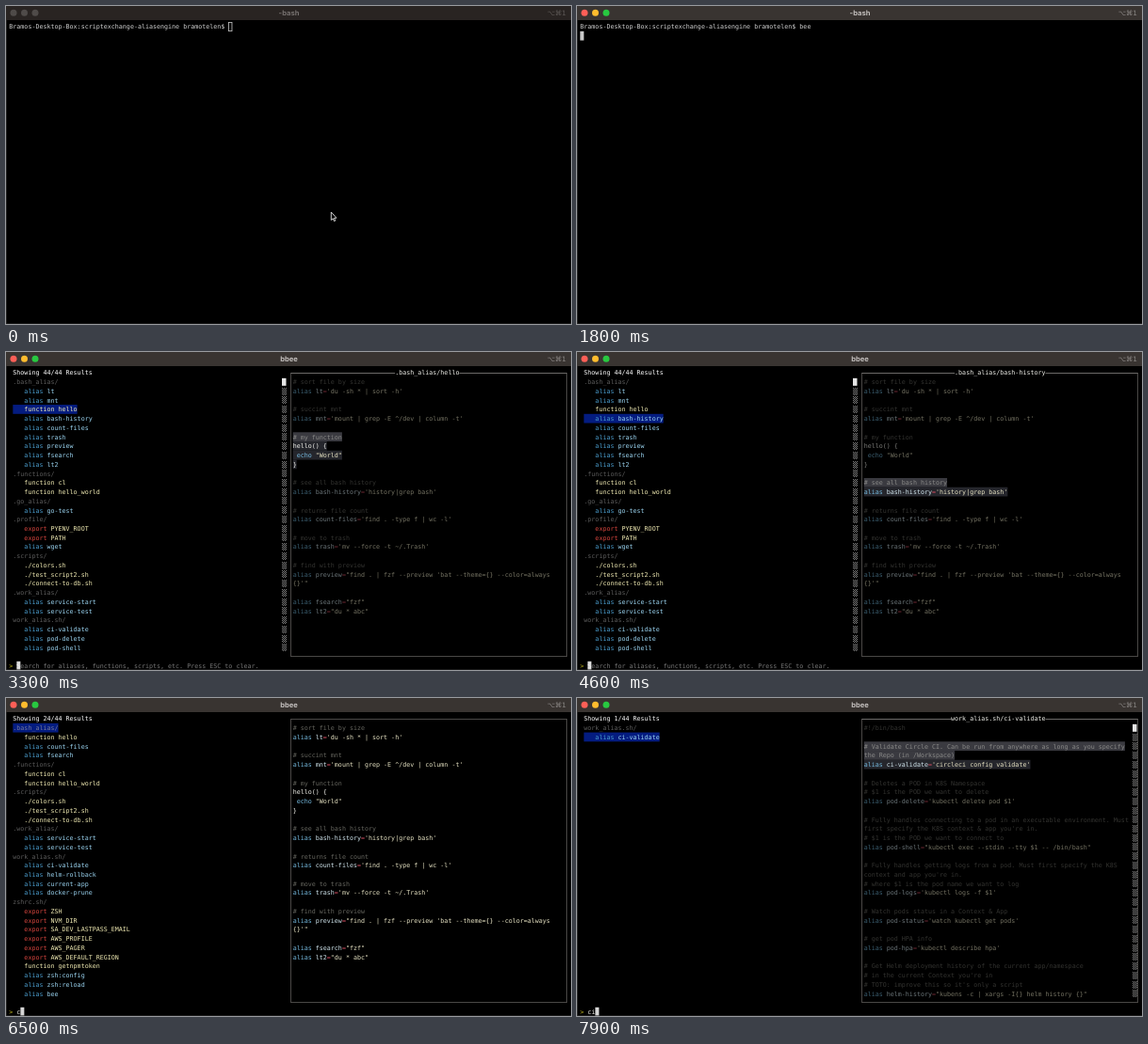
Write an HTML page with a canvas that moves like this. It is 600 px wide and 338 px high and loops after 8 s.

```html
<!DOCTYPE html>
<html lang="en">
<head>
<meta charset="utf-8">
<title>Alias browser in a terminal</title>
<style>
  html, body { margin: 0; width: 100%; height: 100%; overflow: hidden; background: #000; }
  canvas { display: block; width: 600px; height: 338px; }
</style>
</head>
<body>
<canvas id="stage"></canvas>
<script>
const LOOP = 8000, W = 600, H = 338;
const CELL_W = 4.018, CELL_H = 9.74, LEFT = 3.3, TOP = 17.1;
const PANEL_COL = 75, PANEL_COLS = 71, LAST_ROW = 32;
const MONO = '6.67px "DejaVu Sans Mono", monospace';
const C = {
  text: '#f0f0ea', grey: '#5c5c5c', cream: '#f2ecb4', blue: '#4a9ccc', sky: '#9bd5f2',
  red: '#d8463f', select: '#041c80', comment: '#66665f', keyword: '#76bbe0',
  name: '#d3e8f0', op: '#c84a5c', string: '#e8e4c4', markComment: '#3a3a40',
  markCode: '#25262c', border: '#4a4846', cursor: '#c9c9c9'
};

const PROMPT = 'Bramos-Desktop-Box:scriptexchange-aliasengine bramotelen$ ';
const HINT = 'Search for aliases, functions, scripts, etc. Press ESC to clear.';

const ALL = `.bash_alias/
 alias lt
 alias mnt
 function hello
 alias bash-history
 alias count-files
 alias trash
 alias preview
 alias fsearch
 alias lt2
.functions/
 function cl
 function hello_world
.go_alias/
 alias go-test
.profile/
 export PYENV_ROOT
 export PATH
 alias wget
.scripts/
 ./colors.sh
 ./test_script2.sh
 ./connect-to-db.sh
.work_alias/
 alias service-start
 alias service-test
work_alias.sh/
 alias ci-validate
 alias pod-delete
 alias pod-shell`.split('\n');

const WITH_C = `.bash_alias/
 function hello
 alias count-files
 alias fsearch
.functions/
 function cl
 function hello_world
.scripts/
 ./colors.sh
 ./test_script2.sh
 ./connect-to-db.sh
.work_alias/
 alias service-start
 alias service-test
work_alias.sh/
 alias ci-validate
 alias helm-rollback
 alias current-app
 alias docker-prune
zshrc.sh/
 export ZSH
 export NVM_DIR
 export SA_DEV_LASTPASS_EMAIL
 export AWS_PROFILE
 export AWS_PAGER
 export AWS_DEFAULT_REGION
 function getnpmtoken
 alias zsh:config
 alias zsh:reload
 alias bee`.split('\n');

const WITH_CI = ['work_alias.sh/', ' alias ci-validate'];

const BASH_FILE = `# sort file by size
alias lt='du -sh * | sort -h'

# succint mnt
alias mnt='mount | grep -E ^/dev | column -t'

# my function
hello() {
 echo "World"
}

# see all bash history
alias bash-history='history|grep bash'

# returns file count
alias count-files='find . -type f | wc -l'

# move to trash
alias trash='mv --force -t ~/.Trash'

# find with preview
alias preview="find . | fzf --preview 'bat --theme={} --color=always {}'"

alias fsearch="fzf"
alias lt2="du * abc"`;

const WORK_FILE = `#!/bin/bash

# Validate Circle CI. Can be run from anywhere as long as you specify the Repo (in /Workspace)
alias ci-validate='circleci config validate'

# Deletes a POD in K8S Namespace
# $1 is the POD we want to delete
alias pod-delete='kubectl delete pod $1'

# Fully handles connecting to a pod in an executable environment. Must first specify the K8S context & app you're in.
# $1 is the POD we want to connect to
alias pod-shell="kubectl exec --stdin --tty $1 -- /bin/bash"

# Fully handles getting logs from a pod. Must first specify the K8S context and app you're in.
# where $1 is the pod name we want to log
alias pod-logs='kubectl logs -f $1'

# Watch pods status in a Context & App
alias pod-status='watch kubectl get pods'

# get pod HPA info
alias pod-hpa='kubectl describe hpa'

# Get Helm deployment history of the current app/namespace
# in the current Context you're in
# TOTO: improve this so it's only a script
alias helm-history="kubens -c | xargs -I{} helm history {}"`;

// Each step overrides part of the state reached before it.
const STEPS = [
  [0, { active: false, title: '-bash', pointer: 'arrow', typed: '', app: false }],
  [100, { active: true, pointer: 'beam' }],
  [900, { typed: 'b', pointer: '' }],
  [1100, { typed: 'be' }],
  [1300, { typed: 'bee' }],
  [1700, { entered: true }],
  [2000, { app: true, list: ALL, found: 44, row: 0, file: BASH_FILE, block: -1, name: '', query: '' }],
  [2400, { row: 1, block: 0, name: '.bash_alias/lt' }],
  [2600, { title: 'bbee' }],
  [2800, { row: 2, block: 1, name: '.bash_alias/mnt' }],
  [3200, { row: 3, block: 2, name: '.bash_alias/hello' }],
  [3700, { row: 4, block: 3, name: '.bash_alias/bash-history' }],
  [6400, { list: WITH_C, found: 24, row: 0, block: -1, name: '', query: 'c' }],
  [6800, { list: WITH_CI, found: 1, file: WORK_FILE, query: 'ci' }],
  [7400, { row: 1, block: 1, name: 'work_alias.sh/ci-validate' }]
];

const canvas = document.getElementById('stage');
const g = canvas.getContext('2d');
const ratio = window.devicePixelRatio || 1;
canvas.width = W * ratio;
canvas.height = H * ratio;
g.scale(ratio, ratio);
g.textRendering = 'geometricPrecision';

const colX = col => LEFT + col * CELL_W;
const rowY = row => TOP + row * CELL_H;

function rect(x, y, w, h, color) {
  g.fillStyle = color;
  g.fillRect(x, y, w, h);
}

function cells(col, row, count, color) {
  rect(colX(col), rowY(row), count * CELL_W, CELL_H, color);
}

function put(text, col, row, color) {
  g.font = MONO;
  g.textAlign = 'left';
  g.fillStyle = color;
  [...text].forEach((ch, i) => {
    if (ch !== ' ') g.fillText(ch, colX(col + i), rowY(row) + 7.3);
  });
}

function stroke(points, color, width = 1, fill) {
  g.beginPath();
  points.forEach(([x, y], i) => i ? g.lineTo(x, y) : g.moveTo(x, y));
  if (fill) {
    g.closePath();
    g.fillStyle = fill;
    g.fill();
  }
  g.strokeStyle = color;
  g.lineWidth = width;
  g.stroke();
}

function drawTitleBar({ active, title }) {
  rect(0, 0, W, 15, active ? '#393431' : '#292422');
  const lights = active ? ['#ff5f57', '#febc2e', '#28c840'] : Array(3).fill('#4f4b49');
  lights.forEach((color, i) => {
    g.beginPath();
    g.arc(8 + i * 11.5, 7.3, 3.5, 0, 7);
    g.fillStyle = color;
    g.fill();
  });
  g.font = '700 7.6px Inter, sans-serif';
  g.textAlign = 'center';
  g.fillStyle = active ? '#c2bebc' : '#76716f';
  g.fillText(title, 300.5, 10);
  g.font = '7.3px "DejaVu Sans", sans-serif';
  g.textAlign = 'right';
  g.fillStyle = active ? '#8b8785' : '#5d5856';
  g.fillText('⌥⌘1', 595, 9.6);
}

function drawPointer(kind) {
  if (kind === 'arrow') {
    const outline = [[345.3, 219], [345.3, 227.6], [347.2, 226], [348.5, 228.8],
      [349.7, 228.2], [348.5, 225.5], [350.9, 225.3]];
    outline.push(outline[0]);
    stroke(outline, '#e4e4e4', 0.9, '#000');
  } else if (kind === 'beam') {
    stroke([[346.5, 218.5], [346.5, 225]], '#aaa', 0.8);
    stroke([[345, 218.5], [348, 218.5]], '#aaa', 0.6);
    stroke([[345, 225], [348, 225]], '#aaa', 0.6);
  }
}

function drawShell({ active, typed, entered, pointer }) {
  put(PROMPT + typed, 0, 0, '#d2d2d2');
  const col = entered ? 0 : PROMPT.length + typed.length;
  const row = entered ? 1 : 0;
  if (active) {
    cells(col, row, 1, C.cursor);
  } else {
    g.strokeStyle = C.cursor;
    g.lineWidth = 0.8;
    g.strokeRect(colX(col) + 0.2, rowY(row) + 0.4, CELL_W - 0.6, CELL_H - 0.6);
  }
  drawPointer(pointer);
}

// A bright thumb above a dotted track.
function drawScrollbar(col) {
  const x = Math.round(colX(col));
  rect(x, rowY(1) + 1, 4.5, 8, '#e6e6e6');
  for (let row = 2; row <= 30; row++) {
    const y = Math.round(rowY(row)) + 1;
    for (let i = 0; i < 5 * 8; i++) {
      const dx = i % 5, dy = Math.floor(i / 5);
      if ((dx + dy) % 2 === 0) rect(x + dx, y + dy, 1, 1, '#7c7c7c');
    }
  }
}

function drawList({ list, row: selected, found }) {
  const styles = { alias: [C.blue, C.sky], function: [C.cream, C.cream], export: [C.red, C.cream] };
  put(`Showing ${found}/44 Results`, 1, 0, '#fff');
  list.forEach((line, i) => {
    const row = i + 1, item = line.startsWith(' '), text = line.trim();
    if (i === selected) cells(1, row, text.length + (item ? 3 : 0), C.select);
    if (!item) return put(text, 1, row, i === selected ? '#75799a' : C.grey);
    const [kind, name] = text.split(' ');
    const [first, second] = styles[kind] || [C.cream];
    put(kind, 4, row, first);
    if (name) put(name, 5 + kind.length, row, second);
  });
  if (found === 44) drawScrollbar(72);
}

function tokens(line) {
  if (line.startsWith('#')) return [[line, C.comment]];
  const alias = line.match(/^(alias)( [\w-]+)(=)(.*)$/);
  if (alias) return [C.keyword, C.name, C.op, C.string].map((color, i) => [alias[i + 1], color]);
  const echo = line.match(/^( echo)(.*)$/);
  if (echo) return [[echo[1], C.keyword], [echo[2], C.string]];
  return [[line, C.text]];
}

// Word-wraps a coloured line into rows of [character, color].
function wrap(line) {
  let rest = tokens(line).flatMap(([text, color]) => [...text].map(ch => [ch, color]));
  const rows = [];
  while (rest.length > PANEL_COLS) {
    let cut = PANEL_COLS;
    while (rest[cut][0] !== ' ') cut--;
    rows.push(rest.slice(0, cut));
    rest = rest.slice(cut + 1);
  }
  return [...rows, rest];
}

function drawPanel({ file, block, name, found }) {
  const x0 = Math.floor(colX(74.5)) + 0.5, x1 = Math.floor(colX(147.5)) + 0.5;
  const y0 = 22.5, y1 = 323.5;
  g.strokeStyle = C.border;
  g.lineWidth = 1;
  g.strokeRect(x0, y0, x1 - x0, y1 - y0);
  if (name) {
    const col = Math.floor(111 - name.length / 2);
    stroke([[x0, y0], [x1, y0]], '#6c6a68');
    cells(col, 0, name.length, '#000');
    put(name, col, 0, C.text);
  }
  let row = 1;
  file.split('\n\n').forEach((part, i) => {
    const marked = i === block;
    g.globalAlpha = block < 0 || marked ? 1 : 0.5;
    part.split('\n').flatMap(wrap).forEach(line => {
      const isComment = line[0][1] === C.comment;
      if (marked) cells(PANEL_COL, row, line.length, isComment ? C.markComment : C.markCode);
      line.forEach(([ch, color], j) =>
        put(ch, PANEL_COL + j, row, marked && isComment ? '#8a8a88' : color));
      row++;
    });
    row++;
  });
  g.globalAlpha = 1;
  if (found === 1) drawScrollbar(146);
}

function drawSearch({ query }) {
  put('>', 0, LAST_ROW, '#c4b81e');
  if (!query) put(HINT, 2, LAST_ROW, '#777');
  put(query, 2, LAST_ROW, C.text);
  cells(2 + query.length, LAST_ROW, 1, '#d6d6d6');
  if (!query) put('S', 2, LAST_ROW, '#f4f4f4');
}

function draw(state) {
  rect(0, 0, W, H, '#000');
  drawTitleBar(state);
  if (state.app) {
    drawList(state);
    drawPanel(state);
    drawSearch(state);
  } else {
    drawShell(state);
  }
  rect(0, 15, 0.6, H, '#3a3a3a');
  rect(0, H - 0.6, W, 0.6, '#2c2c2c');
}

let shown = -1;
const start = performance.now();

function tick() {
  const time = Math.max(0, performance.now() - start) % LOOP;
  const reached = STEPS.filter(([at]) => at <= time);
  if (reached.length !== shown) {
    shown = reached.length;
    draw(Object.assign({}, ...reached.map(([, change]) => change)));
  }
  requestAnimationFrame(tick);
}
tick();
</script>
</body>
</html>
```
